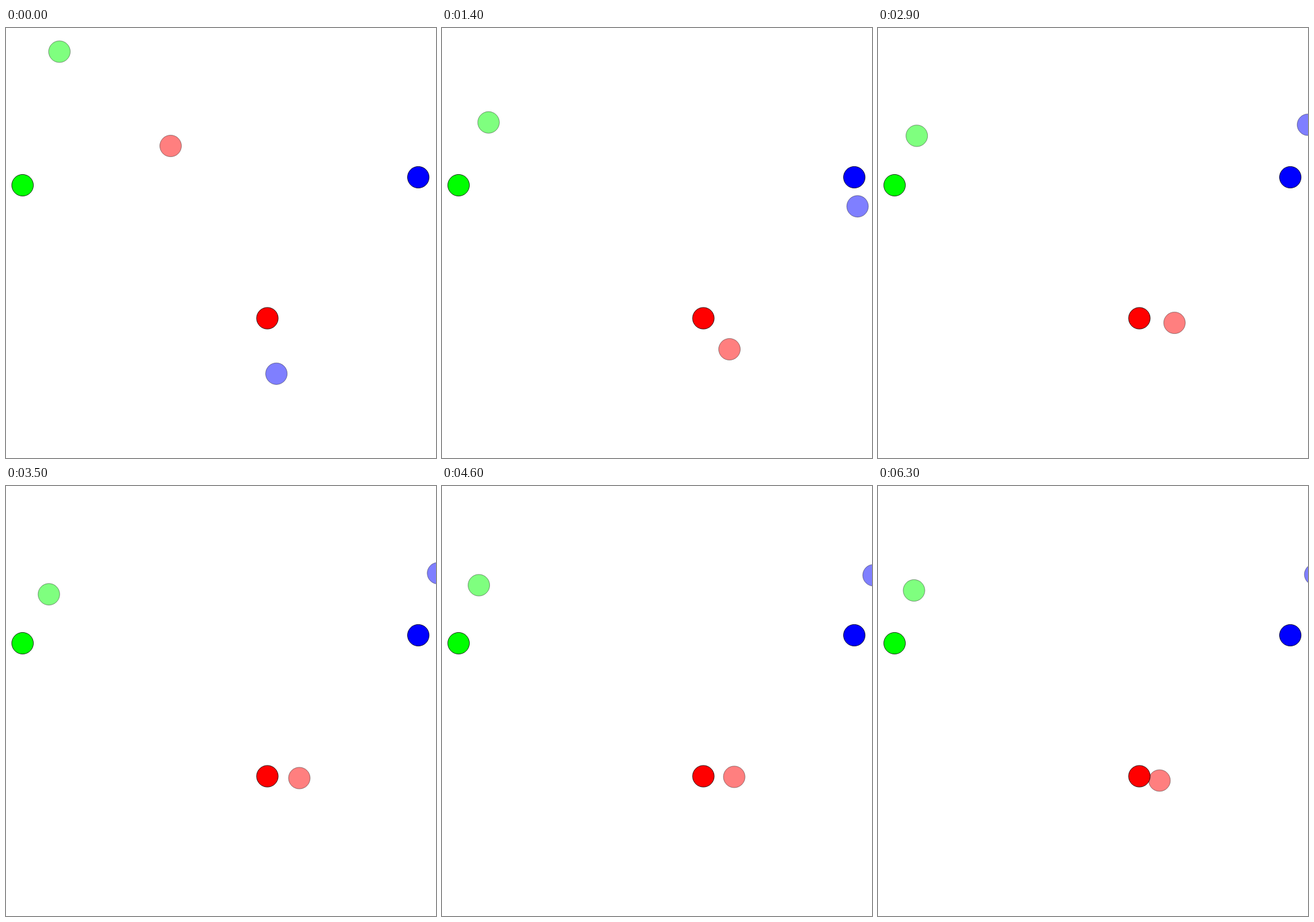
These frames come from a looping animation (700x700 px, 6.4 s). An HTML page with a canvas:

```html
<!DOCTYPE html>
<html lang="en">
<head>
<meta charset="utf-8">
<title>Converging estimates</title>
<style>
  html, body { margin: 0; width: 100%; height: 100%; overflow: hidden; background: #fff; }
  canvas { display: block; }
</style>
</head>
<body>
<canvas id="stage" width="700" height="700"></canvas>
<script>
const ctx = document.getElementById('stage').getContext('2d');
const STEP = 100, LOOP = 6400, RADIUS = 17.6;

// Steps at which every drifting ball passes its next key point.
const TIMES = [0, 7, 14, 22, 35, 46, 53, 63];

const balls = [
  { color: '#f00', home: [425.5, 472.5], keys: [
    [268, 192], [425, 553], [468, 523], [486, 490.5],
    [477.5, 475.5], [475.7, 473.5], [454.5, 480.7], [458.3, 479.5]] },
  { color: '#0f0', home: [27, 256], keys: [
    [87, 38.5], [78, 146], [75.8, 153.7], [56.3, 169.5],
    [69.8, 176.3], [60, 161.5], [81.5, 170.2], [58.6, 170]] },
  { color: '#00f', home: [671.2, 243], keys: [
    [440.2, 562.8], [650, 455], [676.5, 290.3], [693, 193],
    [703.3, 142], [702.5, 145.3], [702.2, 132], [711.7, 144]] }
];

const last = TIMES.length - 1;

function slope(keys, i, axis) {
  const a = Math.max(0, i - 1), b = Math.min(last, i + 1);
  return (keys[b][axis] - keys[a][axis]) / (TIMES[b] - TIMES[a]);
}

// Smooth cubic path through the key points.
function pointAt(keys, step) {
  const i = Math.max(1, TIMES.findIndex(t => t >= step));
  const span = TIMES[i] - TIMES[i - 1];
  const k = (step - TIMES[i - 1]) / span;
  const ease = k * k * (3 - 2 * k);
  return [0, 1].map(axis => {
    const from = keys[i - 1][axis], to = keys[i][axis];
    const out = slope(keys, i - 1, axis) * (1 - k) - slope(keys, i, axis) * k;
    return from + (to - from) * ease + span * k * (1 - k) * out;
  });
}

function disc([x, y], color, alpha) {
  ctx.beginPath();
  ctx.arc(x, y, RADIUS, 0, Math.PI * 2);
  ctx.globalAlpha = alpha;
  ctx.fillStyle = color;
  ctx.fill();
  ctx.lineWidth = 0.8;
  ctx.strokeStyle = '#000';
  ctx.stroke();
}

function draw(now) {
  const step = Math.floor(now % LOOP / STEP);
  ctx.clearRect(0, 0, 700, 700);
  for (const b of balls) disc(pointAt(b.keys, step), b.color, 0.5);
  for (const b of balls) disc(b.home, b.color, 1);
}

const start = performance.now();
function tick() {
  draw(performance.now() - start);
  requestAnimationFrame(tick);
}
tick();
</script>
</body>
</html>
```
